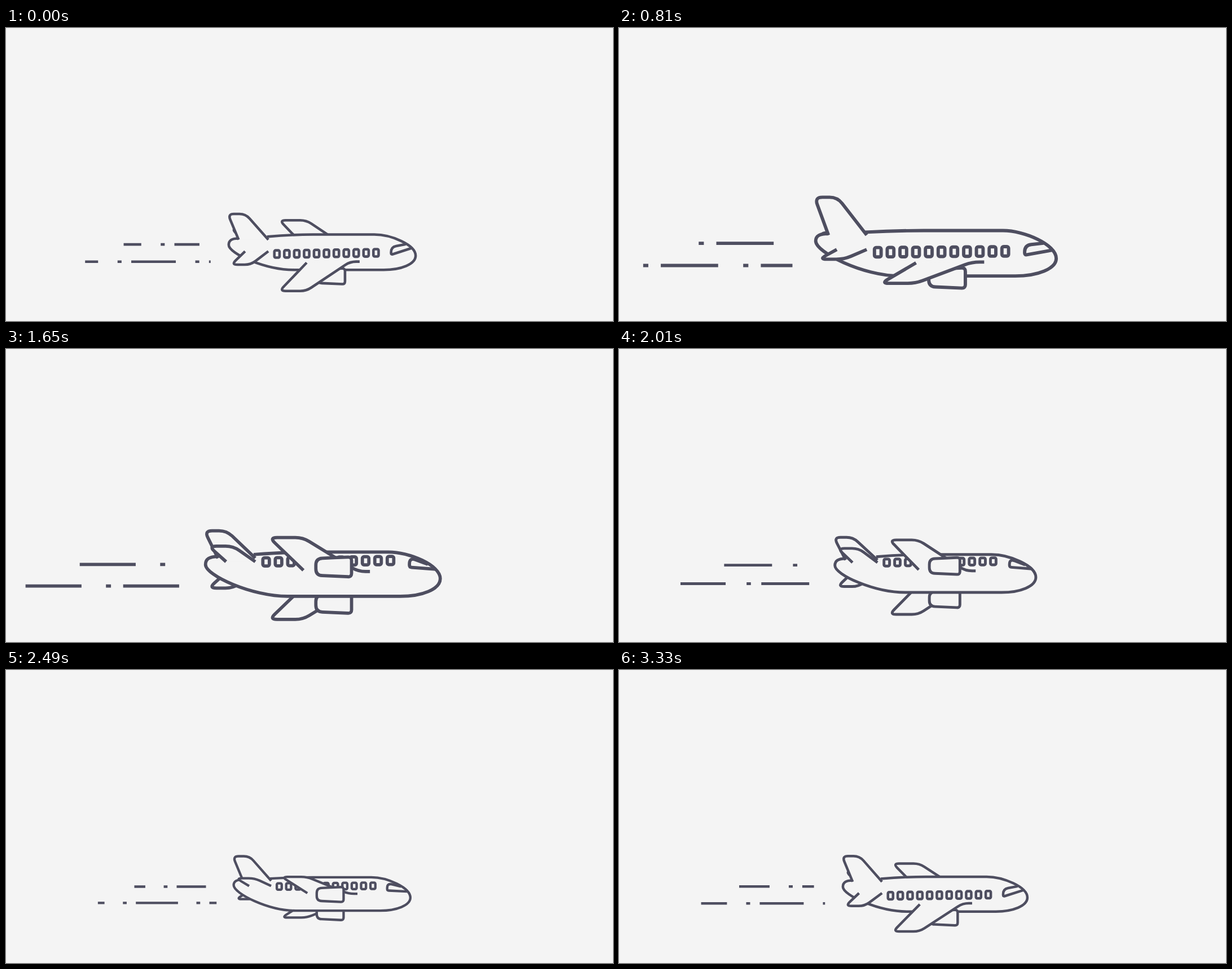
An HTML page for the animation above (3.36 s loop, 1076 by 520 pixels).

```html
<!DOCTYPE html>
<html lang="en">
<head>
<meta charset="utf-8">
<title>Rolling plane</title>
<style>
  html, body { margin: 0; width: 100%; height: 100%; overflow: hidden; background: #f4f4f4; }
  svg { display: block; width: 100%; height: 100%; }
</style>
</head>
<body>
<svg viewBox="0 0 1076 520" fill="#f4f4f4" stroke="#4e4e60" stroke-width="6" stroke-linejoin="round">
  <g id="scene"></g>
</svg>
<script>
const LOOP = 3360, HALF = LOOP / 2;
const CX = 555.5, CY = 391;
const DASHES = [103.5, 45.2, 9.3, 22.5];
const SPEED = 18 * DASHES.reduce((a, b) => a + b) / LOOP;
const scene = document.getElementById('scene');

// The motion hangs briefly three times per loop: [start, length]
const HANGS = [[200, 51], [1200, 81], [2300, 47]];
const hung = t => HANGS.reduce((sum, [at, len]) => sum + Math.min(Math.max(t - at, 0), len), 0);
const clock = t => (t - hung(t)) * LOOP / (LOOP - hung(LOOP));

// cubic-bezier(.42, 0, .33, 1)
function ease(x) {
  let lo = 0, hi = 1;
  for (let i = 0; i < 24; i++) {
    const k = (lo + hi) / 2, j = 1 - k;
    if (3 * j * j * k * .42 + 3 * j * k * k * .33 + k ** 3 < x) lo = k; else hi = k;
  }
  return lo * lo * (3 - 2 * lo);
}

// Sine arch over 0..1 whose top is at x = .32
const arch = x => Math.sin(Math.PI * (x < .32 ? x / .64 : .5 + (x - .32) / 1.36));

function toward([x, y], [x2, y2], r) {
  const k = r / Math.hypot(x2 - x, y2 - y);
  return [x + (x2 - x) * k, y + (y2 - y) * k];
}

// Open line through [x, y, corner radius] points
function outline(points, attrs = '') {
  let d = 'M' + points[0];
  for (let i = 1; i < points.length - 1; i++) {
    const [x, y, r = 14] = points[i];
    d += `L${toward([x, y], points[i - 1], r)}Q${x},${y} ${toward([x, y], points[i + 1], r)}`;
  }
  return `<path d="${d}L${points.at(-1)}" ${attrs}/>`;
}

// Flat surface seen edge-on at roll 0; points are [x, share of span]
const blade = (points, y, span, roll) => outline(points.map(([x, f]) => [x, y + span * f * roll]));
const wing = roll =>
  blade([[526, .2], [463, 1], [525, 1], [627, .17], [649, .17]], 408, 82, roll);
const tail = roll => blade([[383, .26], [351, 1], [396, 1], [437, .26]], 387, 42, roll);

function engine(roll) {
  const y = roll * (roll > 0 ? 26 : 47);
  const corners = [[582, 413], [615, 411.5, 6.5], [615, 448.5, 6.5], [549, 445.5, 12], [549, 414.5, 12], [582, 413]];
  return outline(corners.map(([x, cy, r]) => [x, cy + y, r]));
}

function body(tilt) {
  return `<path d="M434 ${359 + 5 * tilt}Q490 359 540 359H683C722 359 779 ${386 - 3 * tilt} 779 ${411 - 3 * tilt}
    C779 428 745 441 705 441H497C430 441 345 ${392 + 11 * tilt} 345 ${371 + 12 * tilt}
    C345 ${363 + 10 * tilt} 352 ${359.5 + 8 * tilt} 369 ${360 + 8 * tilt}"/>`;
}

function fin(roll, tilt) {
  const base = 362 + 9 * tilt, top = 283 + tilt * (roll > 0 ? 28 : 39.6);
  return outline([[368, base], [343, top], [384, top], [437, base]]);
}

function windscreen(roll, tilt) {
  const y = roll * (roll > 0 ? 6 : 14);
  return outline([[756, 382 - tilt / 2], [722, 382 + y, 12], [722, 400 + y, 4], [771, 400 - 10 * tilt]], 'fill="none"');
}

function windows(roll, tilt) {
  const h = 17 + 2 * Math.min(roll, 0);
  let out = '';
  for (let i = 0; i < 11; i++) {
    const y = 390.2 + 14 * roll - .28 * i * tilt;
    out += `<rect x="${451 + 23 * i}" y="${y - h / 2}" width="12" height="${h}" rx="3"/>`;
  }
  return out;
}

// Dashed streak whose long dash begins at x = phase
const streak = (x0, x1, y, phase) =>
  `<path d="M${x0},${y}H${x1}" stroke-dasharray="${DASHES}" stroke-dashoffset="${x0 - phase}"/>`;

function draw(t) {
  const now = clock(t);
  const turns = (now + LOOP - 1224) / HALF;
  const u = turns % 1, side = Math.floor(turns) % 2 ? 1 : -1;
  const scale = .85 - .15 * side * (1 - 2 * ease(u));
  const roll = side * 1.03 * arch(u), tilt = Math.abs(roll);
  const phase = 119.7 - SPEED * now;

  scene.setAttribute('transform', `translate(${CX} ${CY}) scale(${scale}) translate(${-CX} ${-CY})`);
  scene.innerHTML =
    streak(101, 277, 382, phase + 100.2) + streak(11.5, 303, 422, phase) +
    wing(-roll) + engine(-roll) + tail(-roll) +
    body(tilt) + fin(roll, tilt) + windows(roll, tilt) + windscreen(roll, tilt) + tail(roll) +
    (roll > 0 ? engine(roll) + wing(roll) : wing(roll) + engine(roll));
}

const start = performance.now();
function tick(now) {
  draw(Math.max(0, now - start) % LOOP);
  requestAnimationFrame(tick);
}
draw(0);
requestAnimationFrame(tick);
</script>
</body>
</html>
```
